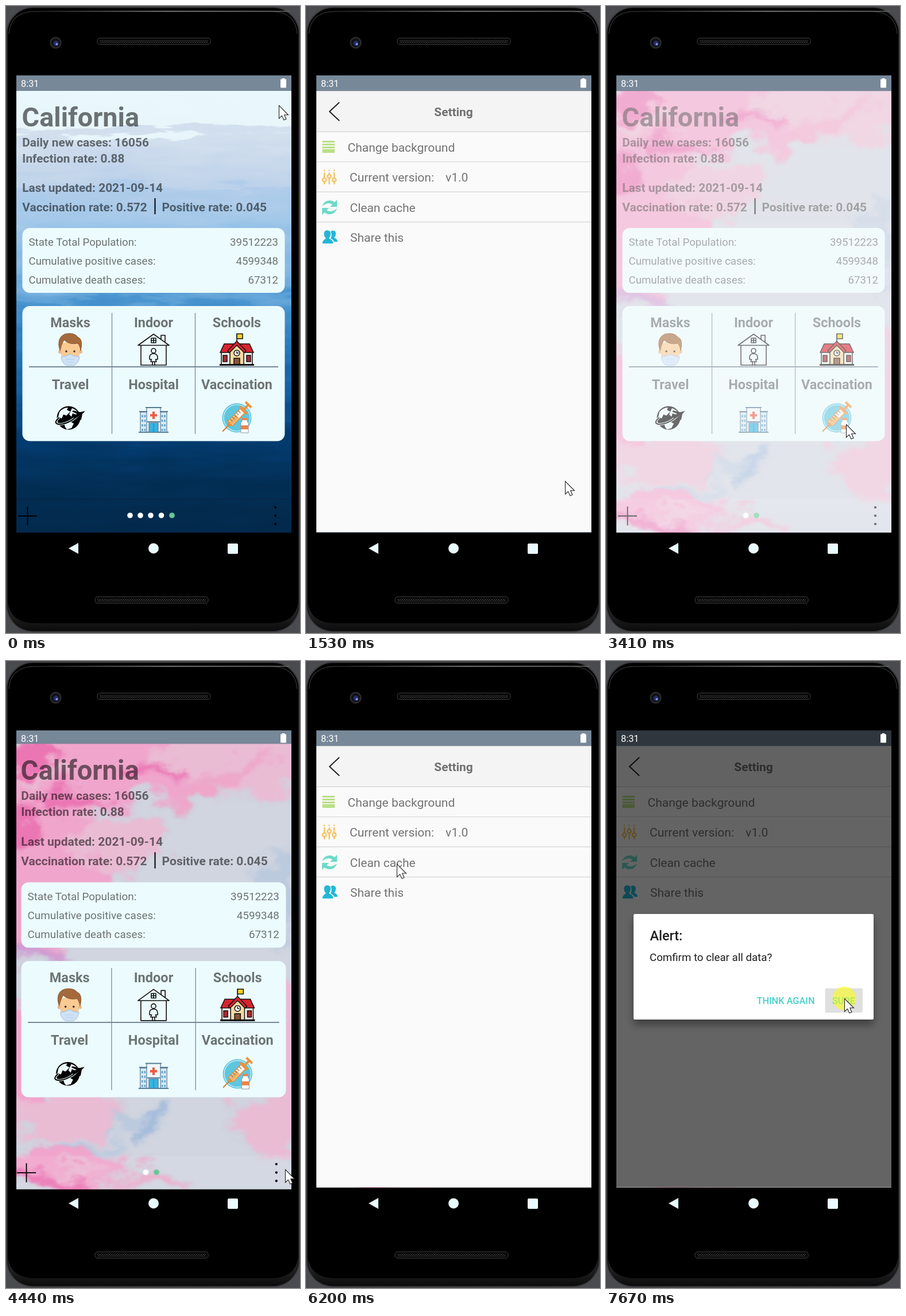
Write an HTML page that moves like this. It is 512x1093 px and loops after 7.99 s.

```html
<!DOCTYPE html>
<html lang="en">
<head>
<meta charset="utf-8">
<title>Phone settings demo</title>
<style>
html, body { margin: 0; width: 100%; height: 100%; overflow: hidden; background: #000; }
svg { display: block; width: 100%; height: 100%; }
text { font-family: Roboto, "Noto Sans", sans-serif; fill: rgba(0,0,0,.54); }
.title { font-size: 46.8px; font-weight: 700; }
.bold { font-size: 20.85px; font-weight: 700; }
.row { font-size: 21px; }
.stat { font-size: 18.7px; }
.tile { font-size: 23.36px; font-weight: 700; }
.btn { font-size: 16.35px; font-weight: 500; }
.theme { font-weight: 700; fill: #000; }
.clock { font-weight: 400; fill: #fff; }
.mid { text-anchor: middle; }
.end { text-anchor: end; }
.ink { fill: #1f1f1f; }
.teal { fill: #48d1cc; }
.line { fill: none; stroke-linecap: round; stroke-linejoin: round; }

.anim { animation: 7.99s step-end infinite; }
.window { transform-origin: 257px 528px; }
#main { animation-name: main; }
#settings { animation-name: settings; opacity: 0; }
#splash { animation-name: splash; opacity: 0; }
#blue { animation-name: blueTheme; }
#pink { animation-name: pinkTheme; opacity: 0; }
#drawer { animation-name: drawer; opacity: 0; }
#lower { animation-name: lower; }
#dialog { animation-name: dialog; opacity: 0; }
#press { animation-name: press; opacity: 0; }
#cursor { animation-name: cursor; transform: translate(475px,173px); }
#tap { animation-name: tap; opacity: 0; }

@keyframes main {
  15.01%, 55.56% { transform: scale(1.0088); }
  15.83%, 56.38% { transform: scale(1.06); }
  16.64%, 57.19% { transform: scale(1.12); }
  19.08%, 59.63% { transform: none; }
}
@keyframes settings {
  15.83%, 56.38% { opacity: .5; transform: scale(.91); }
  16.64%, 57.19% { opacity: 1; transform: scale(.975); }
  17.45%, 58.01% { opacity: 1; transform: scale(.992); }
  18.27%, 58.82% { opacity: 1; transform: scale(.998); }
  19.08%, 59.63% { opacity: 1; transform: none; }
  41.05% { opacity: 0; transform: none; }
  100% { opacity: 1; transform: none; }
}
@keyframes splash {
  37.73% { opacity: .5; transform: scale(.93); }
  38.54% { opacity: 1; transform: scale(.985); }
  39.35% { opacity: 1; transform: none; }
  41.86% { opacity: .68; transform: none; }
  42.67% { opacity: .42; transform: none; }
  43.49% { opacity: .2; transform: none; }
  44.3% { opacity: 0; transform: none; }
}
@keyframes blueTheme { 41.05%, 100% { opacity: 0; } }
@keyframes pinkTheme { 41.05%, 100% { opacity: 1; } }
@keyframes drawer { 25.84% { opacity: 1; } 41.05% { opacity: 0; } }
@keyframes lower { 25.84% { transform: translateY(46.8px); } 41.05% { transform: none; } }
@keyframes dialog { 79.47% { opacity: .4; } 80.35% { opacity: .8; } 81.22%, 100% { opacity: 1; } }
@keyframes press { 95.24% { opacity: .6; } 95.99%, 100% { opacity: 1; } }
@keyframes tap {
  13.39%, 25.03%, 32.03%, 52.06%, 76.84%, 93.36%, 100% { opacity: 1; }
  14.2%, 26.65%, 33.66%, 53.94%, 77.59% { opacity: 0; }
}
@keyframes cursor {
  5.88% { transform: translate(470px,155px); }
  13.39% { transform: translate(468px,888px); }
  16.7% { transform: translate(468px,888px); animation-timing-function: steps(3); }
  19.14% { transform: translate(451px,828px); animation-timing-function: steps(2); }
  20.77% { transform: translate(367px,590px); animation-timing-function: steps(2); }
  22.4% { transform: translate(216px,247px); }
  28.72% { transform: translate(216px,247px); animation-timing-function: steps(4); }
  31.97% { transform: translate(216px,290px); }
  36.1% { transform: translate(216px,290px); animation-timing-function: steps(8); }
  42.67% { transform: translate(418px,729px); animation-timing-function: steps(5); }
  46.68% { transform: translate(452px,906px); }
  47.74% { transform: translate(452px,906px); animation-timing-function: steps(3); }
  50.18% { transform: translate(484.5px,882.5px); }
  55.56% { transform: translate(486px,886px); }
  57.19% { transform: translate(486px,886px); animation-timing-function: steps(4); }
  60.45% { transform: translate(434px,778px); animation-timing-function: steps(2); }
  61.7% { transform: translate(385px,655px); animation-timing-function: steps(2); }
  63.2% { transform: translate(314px,508px); }
  63.95% { transform: translate(282px,445px); animation-timing-function: steps(2); }
  65.58% { transform: translate(225px,375px); animation-timing-function: steps(2); }
  67.2% { transform: translate(178px,345px); animation-timing-function: steps(5); }
  70.96% { transform: translate(158px,353.5px); }
  83.91% { transform: translate(158px,353.5px); animation-timing-function: steps(9); }
  90.98%, 100% { transform: translate(415px,588px); }
}
</style>
</head>
<body>
<svg viewBox="0 0 512 1093">
<defs>
  <linearGradient id="sea" x2="0" y2="1">
    <stop offset="0" stop-color="#eaf9fc"/><stop offset=".125" stop-color="#e8f6fb"/>
    <stop offset=".13" stop-color="#d3e0ee"/><stop offset=".2" stop-color="#c6d7eb"/>
    <stop offset=".24" stop-color="#bcd2ea"/><stop offset=".245" stop-color="#b2cdea"/>
    <stop offset=".31" stop-color="#a3c8e9"/><stop offset=".42" stop-color="#7fb5e2"/>
    <stop offset=".47" stop-color="#5a9fd5"/><stop offset=".475" stop-color="#4b95d0"/>
    <stop offset=".57" stop-color="#2b7bbd"/><stop offset=".67" stop-color="#115a9a"/>
    <stop offset=".76" stop-color="#033c70"/><stop offset=".82" stop-color="#03325c"/>
    <stop offset=".87" stop-color="#022d53"/><stop offset="1" stop-color="#022746"/>
  </linearGradient>
  <linearGradient id="rim" x2="0" y2="1">
    <stop offset="0" stop-color="#303032"/><stop offset="1" stop-color="#0c0c0d"/>
  </linearGradient>
  <linearGradient id="shine"><stop offset="0" stop-color="#222"/><stop offset=".5" stop-color="#8a8a8a"/><stop offset="1" stop-color="#666"/></linearGradient>
  <filter id="waves" x="0" y="0" width="1" height="1" color-interpolation-filters="sRGB">
    <feTurbulence type="fractalNoise" baseFrequency=".008 .045" numOctaves="5" seed="4"/>
    <feDisplacementMap in="SourceGraphic" scale="75" xChannelSelector="R" yChannelSelector="A"/>
  </filter>
  <filter id="marble" x="-.1" y="-.1" width="1.2" height="1.2" color-interpolation-filters="sRGB">
    <feGaussianBlur in="SourceGraphic" stdDeviation="6" result="soft"/>
    <feTurbulence type="fractalNoise" baseFrequency=".014 .02" numOctaves="5" seed="9"/>
    <feDisplacementMap in="soft" scale="95" xChannelSelector="R" yChannelSelector="A"/>
  </filter>
  <filter id="shadow" x="-.1" y="-.2" width="1.2" height="1.5"><feDropShadow dx="0" dy="9" stdDeviation="7" flood-opacity=".38"/></filter>
  <pattern id="mesh" width="4" height="4" patternUnits="userSpaceOnUse">
    <path d="M0 0h2v2H0zM2 2h2v2H2z" fill="#343434"/>
  </pattern>
  <clipPath id="screen"><rect x="18" y="121" width="479" height="815"/></clipPath>
  <clipPath id="page"><rect x="18" y="148" width="479" height="769.5"/></clipPath>
  <rect id="bar" x="18" y="121" width="479" height="27.5" fill="#789"/>
  <g id="speaker">
    <rect width="197" height="11" rx="4.5" stroke="#484848"/><rect x="4" y="3" width="189" height="6" fill="url(#mesh)"/>
  </g>
  <circle id="dot" r="4.8"/>
</defs>

<!-- phone body -->
<rect width="512" height="1093" fill="#4a4b4e"/>
<rect x="1.5" y="2.5" width="509" height="1088" rx="46" stroke="#38383b" stroke-width="2"/>
<path d="M3 1040Q8 1076 52 1076H460Q504 1076 509 1040Q508 1088 464 1089H48Q4 1088 3 1040Z" fill="url(#rim)"/>
<path d="M5 48Q8 10 50 9.5H462Q504 10 507 48" class="line" stroke="#2c2c2e" stroke-width="1.5"/>
<rect x="70" y="8.5" width="424" height="1.5" fill="url(#shine)"/>
<use href="#speaker" x="159" y="56"/><use href="#speaker" x="155" y="1030"/>
<circle cx="86.5" cy="64" r="9" fill="#101116" stroke="#2c2c2f" stroke-width="2.5"/>
<circle cx="87" cy="65" r="4.5" fill="#272e63"/><circle cx="88.5" cy="66.5" r="2" fill="#7f99e8"/>
<g fill="#e9fbff">
  <path d="M109 945.5L126 936V955Z"/><circle cx="257" cy="945.5" r="9"/><rect x="386" y="937" width="18" height="18" rx="2"/>
</g>

<g clip-path="url(#screen)">
  <g id="main" class="anim window">
    <use href="#bar"/>
    <g clip-path="url(#page)">
      <g id="blue" class="anim">
        <rect x="-40" y="110" width="592" height="850" fill="url(#sea)" filter="url(#waves)"/>
        <rect x="18" y="859" width="479" height="1" fill="#0d2238" opacity=".7"/>
        <g fill="#fff"><use href="#dot" x="216" y="888"/><use href="#dot" x="234" y="888"/><use href="#dot" x="252" y="888"/><use href="#dot" x="270.5" y="888"/></g>
        <use href="#dot" x="289" y="888" fill="#66c795"/>
      </g>
      <g id="pink" class="anim">
        <rect x="18" y="148" width="479" height="770" fill="#d0d5e0"/>
        <g filter="url(#marble)">
          <g fill="#f0a5cc">
            <ellipse cx="40" cy="320" rx="140" ry="190"/><ellipse cx="10" cy="690" rx="50" ry="120"/>
            <ellipse cx="220" cy="180" rx="150" ry="75"/><ellipse cx="70" cy="880" rx="140" ry="40"/>
          </g>
          <g fill="#eabcd4">
            <ellipse cx="410" cy="175" rx="140" ry="60"/><ellipse cx="200" cy="320" rx="85" ry="50"/>
            <ellipse cx="500" cy="690" rx="35" ry="130"/><ellipse cx="460" cy="800" rx="70" ry="55"/>
            <ellipse cx="90" cy="790" rx="110" ry="38"/><ellipse cx="70" cy="205" rx="50" ry="9"/><ellipse cx="130" cy="885" rx="60" ry="7"/>
          </g>
          <g fill="#eb76b4">
            <ellipse cx="40" cy="165" rx="55" ry="28"/><ellipse cx="110" cy="245" rx="65" ry="14"/>
            <ellipse cx="25" cy="300" rx="32" ry="45"/><ellipse cx="250" cy="200" rx="60" ry="9"/><ellipse cx="65" cy="906" rx="75" ry="12"/>
          </g>
          <g fill="#efa6c8">
            <ellipse cx="340" cy="225" rx="70" ry="11" transform="rotate(-30 340 225)"/>
            <ellipse cx="420" cy="185" rx="50" ry="8" transform="rotate(-30 420 185)"/>
            <ellipse cx="250" cy="905" rx="60" ry="9"/>
          </g>
          <g fill="#bccade">
            <ellipse cx="215" cy="800" rx="45" ry="20"/><ellipse cx="150" cy="838" rx="70" ry="8"/><ellipse cx="470" cy="420" rx="30" ry="90"/>
          </g>
          <ellipse cx="255" cy="800" rx="10" ry="50" fill="#a3bbdb"/>
          <ellipse cx="40" cy="512" rx="50" ry="12" fill="#cf9dd2"/>
        </g>
        <rect x="18" y="859" width="479" height="58" fill="#fff" opacity=".08"/>
        <use href="#dot" x="243.5" y="888" fill="#fff"/><use href="#dot" x="262" y="888" fill="#66c795"/>
      </g>
    </g>

    <text class="title" x="27.5" y="210">California</text>
    <g class="bold">
      <text x="28.3" y="245">Daily new cases: 16056</text>
      <text x="28.3" y="272.5">Infection rate: 0.88</text>
      <text x="28.3" y="324">Last updated: 2021-09-14</text>
      <text x="28.3" y="358">Vaccination rate: 0.572</text>
      <text x="271.5" y="358">Positive rate: 0.045</text>
    </g>
    <rect x="258.5" y="335" width="2" height="28"/>
    <g fill="#ecfbfd">
      <rect x="28.5" y="387" width="457" height="113" rx="13"/><rect x="28.5" y="523" width="457" height="235.5" rx="13"/>
    </g>
    <g class="stat">
      <text x="39.5" y="418">State Total Population:</text><text class="end" x="474" y="418">39512223</text>
      <text x="39.5" y="451">Cumulative positive cases:</text><text class="end" x="474" y="451">4599348</text>
      <text x="39.5" y="483.5">Cumulative death cases:</text><text class="end" x="474" y="483.5">67312</text>
    </g>
    <path d="M184.5 535V746M329.5 535V746" stroke="#7d8b99" stroke-width="1.3"/>
    <path d="M40 629H474" stroke="#789" stroke-width="2"/>
    <g class="tile mid">
      <text x="112" y="560">Masks</text><text x="257" y="560">Indoor</text><text x="402" y="560">Schools</text>
      <text x="112" y="668">Travel</text><text x="257" y="668">Hospital</text><text x="402" y="668">Vaccination</text>
    </g>

    <!-- masks -->
    <g transform="translate(112 599)">
      <path d="M-17-10Q-18 18-8 25Q0 30 8 25Q18 18 17-10Q8-18-17-10Z" fill="#f9ca92"/>
      <circle cx="-18" cy="4" r="3" fill="#f0b87e"/><circle cx="18" cy="4" r="3" fill="#f0b87e"/>
      <path d="M-18 2Q-25-20-10-27Q6-31 13-22Q23-18 18 2Q17-7 13-11Q-2-8-11-17Q-16-9-18 2Z" fill="#a56a3c" stroke="#8b5630"/>
      <circle cx="-7" cy="3" r="1.8" fill="#43342c"/><circle cx="7" cy="3" r="1.8" fill="#43342c"/>
      <path d="M-17 5L-13 13M17 5L13 13" stroke="#c7d9ea"/>
      <path d="M-16 13Q-8 12 0 8Q8 12 16 13Q14 24 7 27.500H-7Q-14 24-16 13Z" fill="#cfe2f6" stroke="#a6bfd8"/>
      <path d="M-8 17H8M-7 22H7" stroke="#b9d0e8"/>
    </g>
    <!-- indoor -->
    <g class="line" stroke="#111" stroke-width="1.6">
      <path d="M235 592V626H279V592M230 591.500L257 572L284 591.500H230ZM270 581V574H277V586"/>
      <rect x="253" y="579" width="8" height="8"/><path d="M257 579V587M253 583H261"/>
      <path d="M250 613Q250 606 257 606T264 613V616H260.500L262 620H252L253.500 616H250ZM255 620V626M259 620V626"/>
      <circle cx="257" cy="601" r="4"/>
    </g>
    <!-- schools -->
    <g stroke="#111" stroke-width="1.5">
      <path d="M402 571V586"/><path d="M402 571.500H412V580H402Z" fill="#f6d32b"/>
      <path d="M375 603H429V626H375Z" fill="#f3f0ea"/><path d="M380 589H424L431 604H373Z" fill="#d8232f"/>
      <path d="M390 626V600L402 588L414 600V626Z" fill="#f6d9a0"/><path d="M386 601L402 584L418 601L415 604.500L402 591.500L389 604.500Z" fill="#d8232f"/>
      <circle cx="402" cy="605" r="5" fill="#fff"/><path d="M402 602V605H405" fill="none"/>
      <path d="M397 626V614H407V626Z" fill="#87563a"/>
      <path d="M378 609H385V620H378ZM419 609H426V620H419Z" fill="#b3282f"/>
      <path d="M372 625.500H432" stroke-width="3"/>
    </g>
    <!-- travel -->
    <circle cx="109" cy="718" r="20.5"/>
    <g fill="#ecfbfd">
      <path d="M93 708Q99 700 108 700L106 704L112 707L105 714L100 712L97 719L91 716Z"/>
      <path d="M115 701Q123 704 127 710L121 712L116 710L114 716L110 712ZM102 727L111 724L118 728L114 736L106 738Q101 733 102 727Z"/>
    </g>
    <path d="M92 718Q82 727 91 729Q110 730 129 710" class="line" stroke="#ecfbfd" stroke-width="4"/>
    <path d="M92 718Q82 727 91 729Q110 730 129 710" class="line" stroke="#000" stroke-width="2"/>
    <path d="M138 706L129 708L117 705L115 707L124 711L119 715L115 714L119 719L124 717L128 714L129 722L131 721L133 711Z"/>
    <!-- hospital -->
    <g stroke="#557b98" stroke-width="1.2">
      <path d="M234 708H246V743H234ZM268 708H280V743H268Z" fill="#dbeaf3"/><path d="M245 700H269V743H245Z" fill="#eef6f9"/>
      <path d="M232 707H246M268 707H282M231 743H283M243 700H271" stroke-width="2"/>
      <path d="M249 727H265V743H249Z" fill="#34b5e4"/><path d="M257 727V743"/><path d="M246 725H268" stroke-width="2"/>
    </g>
    <path d="M255 707H259V711.500H263V715.500H259V720H255V715.500H251V711.500H255Z" fill="#ec5a43"/>
    <path d="M237.500 713V741M242 713V741M272 713V741M276.500 713V741" stroke="#5ba3cf" stroke-width="2.500" stroke-dasharray="4 4"/>
    <!-- vaccination -->
    <circle cx="402" cy="718" r="25.5" fill="#5fc6df"/>
    <circle cx="402" cy="718" r="23" fill="none" stroke="#d5f1f5" stroke-width="1.2"/>
    <g transform="translate(400 718) rotate(-46)">
      <path d="M-33 0H-17" stroke="#d97a2a" stroke-width="2"/><path d="M-18-3H-14V3H-18Z" fill="#e98a32"/>
      <rect x="-14" y="-5.500" width="31" height="11" fill="#f8f3e6" stroke="#e98a32" stroke-width="1.5"/>
      <rect x="-13" y="-4" width="17" height="8" fill="#f5b061"/><path d="M-8-5V0M-3-5V0M2-5V0M7-5V0M12-5V0" stroke="#666"/>
      <path d="M17-9H21V9H17ZM21-2H30V2H21ZM30-7H34V7H30Z" fill="#f0913a"/>
    </g>
    <path d="M411 719H420V724L422 727V744H409V727L411 724Z" fill="#fff" stroke="#8a9aa6"/><path d="M411 718H420V722H411ZM409 731H422V738H409Z" fill="#e8854c"/>

    <path d="M21 889H54M37.5 872.5V905.5" stroke="#000" stroke-width="1.8"/>
    <circle cx="469" cy="874" r="2.1"/><circle cx="469" cy="888.5" r="2.1"/><circle cx="469" cy="903" r="2.1"/>
  </g>

  <g id="settings" class="anim window">
    <rect x="18" y="121" width="479" height="796.5" fill="#fafafa"/><use href="#bar"/>
    <rect x="18" y="148.5" width="479" height="71" fill="#f4f4f4"/><rect x="18" y="218.5" width="479" height="1.5" fill="#dadada"/>
    <path d="M57.5 168.5L41 184L57.5 199.5" class="line" stroke="#222" stroke-width="2"/>
    <text class="bold mid" x="257" y="191.5">Setting</text>
    <path d="M28.5 236.5H50M28.5 241.5H50M28.5 246.5H50" stroke="#b9e086" stroke-width="3"/><rect x="28.5" y="249.5" width="21.5" height="6.5" fill="#b9e086"/>
    <text class="row" x="72.5" y="254">Change background</text>
    <rect x="18" y="271" width="479" height="1.3" fill="#dadada"/>
    <g id="drawer" class="anim">
      <rect x="18" y="272" width="160" height="47" fill="#c6edd1"/><rect x="177.5" y="272" width="160" height="47" fill="#fdadae"/><rect x="337" y="272" width="160" height="47" fill="#87ceeb"/>
      <text class="btn theme mid" x="97.5" y="302">Green</text><text class="btn theme mid" x="257" y="302">Red</text><text class="btn theme mid" x="417" y="302">Blue</text>
    </g>
    <g id="lower" class="anim">
      <g class="line" stroke="#f6c05c" stroke-width="2.3">
        <path d="M32 291V299M32 307V310M40.5 291V293M40.5 301V310M49 291V299M49 307V310"/>
        <circle cx="32" cy="303" r="3.2"/><circle cx="40.5" cy="297" r="3.2"/><circle cx="49" cy="303" r="3.2"/>
        <path d="M32 286.5V287M40.5 286.5V287M49 286.5V287"/>
      </g>
      <text class="row" x="76" y="306">Current version:</text><text class="row" x="243" y="306">v1.0</text>
      <g fill="#6bdac9">
        <path id="swirl" d="M28 349Q32 338 43 339Q47 340 50 342L54 338V350H42L46 346Q38 341 28 349Z"/>
        <use href="#swirl" transform="rotate(180 41 351)"/>
      </g>
      <text class="row" x="76.5" y="358.5">Clean cache</text>
      <g fill="#22b7d8">
        <path d="M43 393Q50 389 52 396Q52 401 49 404Q55 406 55 411H49Q47 407 43 405Q46 399 43 393Z"/>
        <path d="M37 391Q43 391 43 398Q42 403 40 405Q47 408 47.5 414H28.5Q29 408 35 405Q32 403 31.5 398Q31 391 37 391Z"/>
      </g>
      <text class="row" x="77" y="411">Share this</text>
      <path d="M18 324H497M18 376.5H497" stroke="#dadada" stroke-width="1.3"/>
    </g>
  </g>

  <g id="splash" class="anim window">
    <rect x="18" y="121" width="479" height="796.5" fill="#fafafa"/><use href="#bar"/>
  </g>

  <g id="dialog" class="anim">
    <rect x="18" y="121" width="479" height="796.5" opacity=".6"/>
    <rect x="48" y="441" width="418" height="184" rx="2.5" fill="#fff" filter="url(#shadow)"/>
    <text class="ink" x="76.5" y="487" font-size="23.36" font-weight="500">Alert:</text>
    <text class="stat ink" x="76" y="523">Comfirm to clear all data?</text>
    <rect id="press" class="anim" x="381.5" y="570.5" width="65.5" height="42.5" rx="2.5" fill="#dfdfdf"/>
    <text class="btn teal mid" x="313" y="598">THINK AGAIN</text><text class="btn teal mid" x="414" y="598">SURE</text>
  </g>
</g>

<!-- system status -->
<text x="26" y="141" class="btn clock">8:31</text>
<path d="M481 126.5H485V128H487.5V142H478.5V128H481Z" fill="#fff" stroke="#fff" stroke-linejoin="round"/>

<g id="cursor" class="anim">
  <circle id="tap" class="anim" r="20.5" fill="#ff0" fill-opacity=".55"/>
  <path d="M.5.5V23L5.5 18.3L9 25.8L13 24L9.7 16.8H16.5Z" fill="#fff" stroke="#222" stroke-width="1.1"/>
</g>
</svg>
</body>
</html>
```
